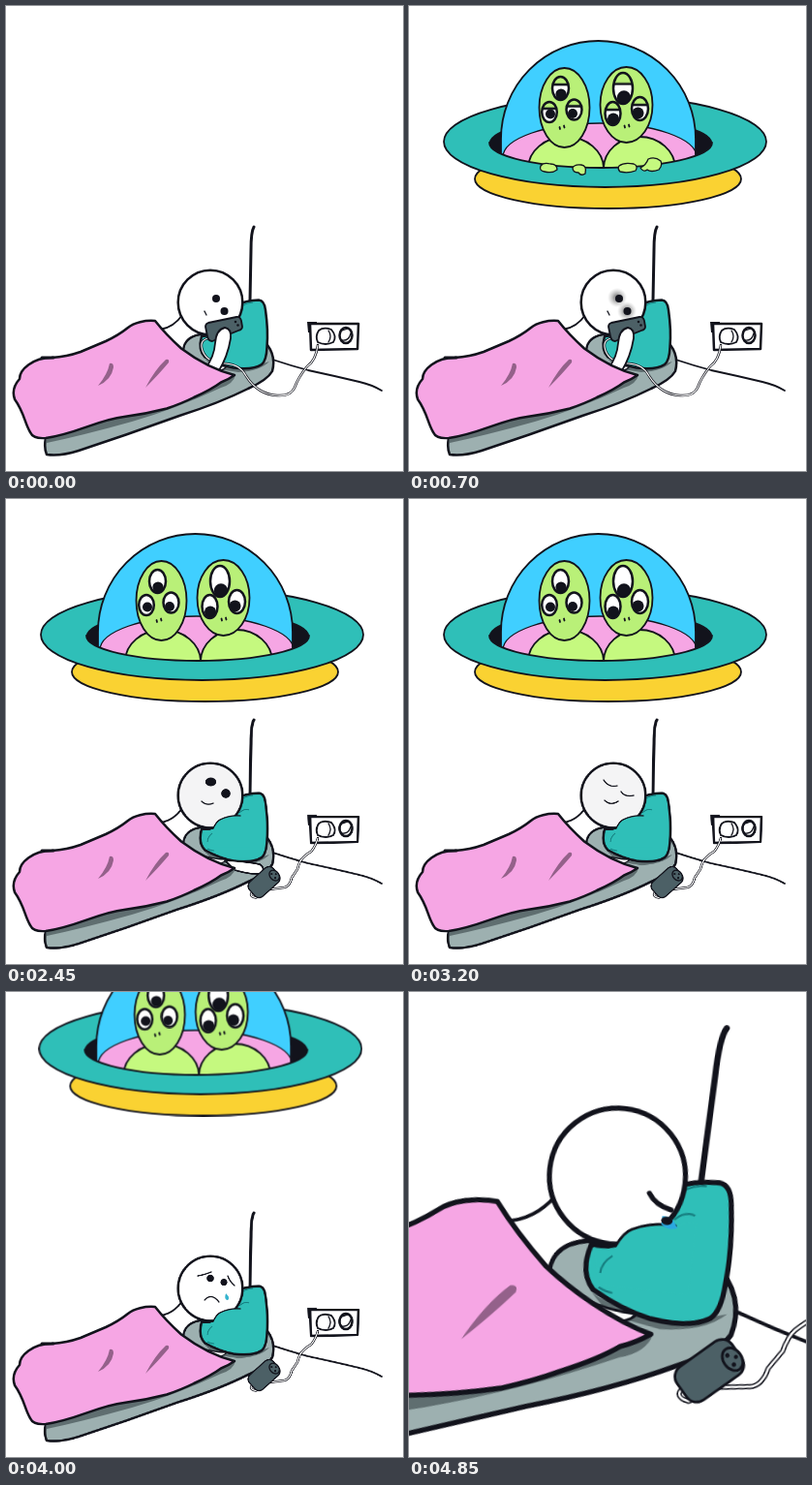
Recreate the animation shown at these times as an HTML page. Size 410 px wide and 480 px high, loop 4950 ms.

```html
<!DOCTYPE html>
<html lang="en">
<head>
<meta charset="utf-8">
<title>Visitors at bedtime</title>
<style>
html, body { margin: 0; width: 100%; height: 100%; overflow: hidden; background: #fff; }
svg { display: block; width: 410px; height: 480px; }
.ink { stroke: #12131c; stroke-width: 2.5; stroke-linejoin: round; stroke-linecap: round; }
.thin { stroke-width: 1.3; }
.mid { stroke-width: 1.8; }
.bold { stroke-width: 3; }
.line { fill: none; }
.white { fill: #fff; }
.dot { fill: #12131c; }
.teal { fill: #2fbfb8; }
.grey { fill: #9db0b0; }
.dark { fill: #4c6066; }
.shade { fill: #5f6e70; }
.pink { fill: #f6a6e4; }
.green { fill: #c5f97f; }
.head { fill: #b9f078; }
.fold { fill: #94618a; }
.crease { fill: none; stroke: #167f80; }
.core { fill: none; stroke: #fff; stroke-width: 1.1; }

.zoom, .ufo, .lid, .tired, .skin, .show { animation: 4.95s linear infinite; }
.show { animation-timing-function: step-end; }
.zoom { animation-name: zoom; }
.ufo { animation-name: fly; }
.lid { animation-name: lid; transform-box: fill-box; }
.tired { animation-name: tired; }
.skin { animation-name: skin; fill: #fff; }
.reading { animation-name: reading; }
.worried { animation-name: worried; }
.smiling { animation-name: smiling; }
.asleep { animation-name: asleep; }
.sad { animation-name: sad; }
.crying { animation-name: crying; }
.held { animation-name: held; }
.dropped { animation-name: dropped; }

@keyframes zoom {
  0%, 88.89% { transform: translate(0, 0) rotate(0) scale(1); animation-timing-function: ease-in-out; }
  97.98%, 100% { transform: translate(-154px, -501.8px) rotate(6.5deg) scale(2.11); }
}
@keyframes fly {
  0% { transform: translate(46px, -214px); animation-timing-function: cubic-bezier(.3, .4, .6, 1); }
  11.1%, 71.7% { transform: translate(0, 0); animation-timing-function: ease-in; }
  77.8% { transform: translate(3px, -38px); }
  80.8% { transform: translate(-1.5px, -81px); }
  84.2% { transform: translate(-28px, -140px); }
  87.9%, 100% { transform: translate(-45px, -214px); }
}
@keyframes lid {
  0%, 15% { transform: translateY(42%); }
  31.3% { transform: translateY(33%); }
  40.4%, 100% { transform: translateY(0); }
}
@keyframes tired { 0%, 5% { opacity: 0; } 13%, 19% { opacity: 1; } 22.2%, 100% { opacity: 0; } }
@keyframes skin { 0%, 38% { fill: #fff; } 45%, 68% { fill: #f4f4f5; } 73%, 100% { fill: #fff; } }
@keyframes reading { 0% { opacity: 1; } 22.2%, 100% { opacity: 0; } }
@keyframes worried { 0% { opacity: 0; } 22.2% { opacity: 1; } 40.4%, 100% { opacity: 0; } }
@keyframes smiling { 0% { opacity: 0; } 40.4% { opacity: 1; } 55.6%, 100% { opacity: 0; } }
@keyframes asleep { 0% { opacity: 0; } 55.6% { opacity: 1; } 72.7%, 100% { opacity: 0; } }
@keyframes sad { 0% { opacity: 0; } 72.7% { opacity: 1; } 89.9%, 100% { opacity: 0; } }
@keyframes crying { 0% { opacity: 0; } 89.9%, 100% { opacity: 1; } }
@keyframes held { 0% { opacity: 1; } 40.4%, 100% { opacity: 0; } }
@keyframes dropped { 0% { opacity: 0; } 40.4%, 100% { opacity: 1; } }
</style>
</head>
<body>
<svg viewBox="0 0 410 480">
  <defs>
    <radialGradient id="bag">
      <stop offset=".3" stop-color="#777" stop-opacity=".75"/>
      <stop offset="1" stop-color="#aaa" stop-opacity="0"/>
    </radialGradient>
    <clipPath id="cabin"><path d="M70 0H330V141H313A115 26 0 0 1 83 141H70Z"/></clipPath>
    <path id="heldCable" d="M209 343Q199 345 203 356Q208 369 227 369Q242 370 248 382Q260 401 280 402Q294 403 298 394Q302 383 311 372Q320 366 322 350"/>
    <path id="looseCable" d="M255 405Q250 410 258 411.5Q264 409 272 403L287 401Q293 400 295 391L301 382Q303 374 306 371Q311 366 315 364Q320 358 322 350"/>
  </defs>

  <g class="zoom">
    <path class="ink line bold" d="M256 228Q253 233 253 252L252 304"/>
    <path class="ink line mid" d="M277 365.5Q295 371.5 312 376Q340 382 365 388Q378 391 388 397"/>

    <g id="outlet">
      <path class="ink white" d="M314 328L364 328L363 354L315 355Z"/>
      <path class="dot" d="M311 326H321V329H315V337H312Z"/>
      <ellipse class="ink white" cx="351" cy="340" rx="6.5" ry="8"/>
      <path class="ink line thin" d="M347 345Q354 346 356 338M347 335L353 333"/>
      <path class="ink white mid" d="M323 335Q328 331 336 334Q342 341 338 347Q330 351 322 347Q319 341 323 335Z"/>
      <path class="ink line thin" d="M333 335Q337 341 333 347"/>
    </g>

    <path class="ink grey" d="M41 446Q39 456 42 463Q56 465 75 459L124 442.5L179 423Q220 410 250 395Q270 386 275 377Q279 362 270 350Q245 338 200 339Q184 342 183 355L150 400Z"/>
    <path class="shade" d="M205 364Q235 380 272 367Q262 377 240 378L215 374Z"/>
    <path class="white" d="M158 334Q172 332 181 319L200 338Q184 341 183 355L168 352Z"/>
    <path class="ink line mid" d="M159 334Q173 332 182 319M183 355Q184 342 200 339"/>
    <path class="ink white thin" d="M200 367Q214 372 228 372Q224 377 215 377Z"/>

    <path class="ink teal" d="M240 308Q248 304 261 303.5Q267 304 268 314Q271 335 269.5 352Q269 366 264 370Q255 376 235 373.5Q221 371 205.5 362.5Q198 355 202 341Q222 341 240 308Z"/>
    <path class="crease" d="M243 310Q249 306 255 306"/>
    <circle class="ink skin" cx="211" cy="306" r="33.3"/>

    <g class="show reading">
      <g class="tired"><circle cx="215" cy="301" r="10" fill="url(#bag)"/><circle cx="225" cy="315" r="10" fill="url(#bag)"/></g>
      <circle class="dot" cx="217" cy="302" r="4"/>
      <circle class="dot" cx="225.5" cy="315" r="4"/>
      <path class="ink line thin" d="M205 315L207 319"/>
    </g>
    <g class="show worried">
      <ellipse class="dot" cx="211.5" cy="292" rx="5.4" ry="4.6"/>
      <ellipse class="dot" cx="227" cy="303.5" rx="4.8" ry="4.6"/>
      <path class="ink line thin" d="M203 287Q207 282 213 282M228 290L236 294M201 312L210 313"/>
    </g>
    <g class="show smiling">
      <ellipse class="dot" cx="211.5" cy="292" rx="5.6" ry="4.5"/>
      <ellipse class="dot" cx="227" cy="304" rx="4.8" ry="4.8"/>
      <path class="ink line thin" d="M202 312Q207 317 214 314"/>
    </g>
    <g class="show asleep ink line thin">
      <path d="M201 290Q206 298 215 296M219 302Q223 308 232 306M202 311Q208 317 216 312"/>
    </g>
    <g class="show sad">
      <circle class="dot" cx="211" cy="295.5" r="3.8"/>
      <circle class="dot" cx="225" cy="299.5" r="3.6"/>
      <path class="ink line thin" d="M198 293Q205 292 212 289M229 293Q231 299 236 303M205 318Q212 310 220 320"/>
      <path fill="#36b4ce" d="M227 311Q232 316 229 318Q225 318 227 311Z"/>
    </g>

    <g class="show dropped">
      <path class="teal" d="M203 341Q209 342 214 340Q217 333 221 331Q231 326 242 327Q248 324 252 324V360H208Z"/>
      <path class="ink line thin" d="M203 341Q209 342 214 340Q217 333 221 331Q231 326 242 327"/>
      <path class="crease" d="M241 324Q246 319 251 321M208 354Q208 349 213 345M208 361Q212 363 215 363"/>
    </g>
    <g class="show crying">
      <path fill="#2aa9e0" d="M235 323Q240 322 243 328Q239 330 235 327Z"/>
      <ellipse class="dot" cx="237.5" cy="325" rx="2.8" ry="2"/>
      <path class="ink line" d="M227.5 312.5Q231 318 239 319.5"/>
    </g>

    <g class="show smiling">
      <path class="ink white mid" d="M226 373Q247 374 262 377Q268 381 264 386Q258 389 236 383Z"/>
    </g>

    <g class="show held">
      <use href="#heldCable" class="ink line"/>
      <use href="#heldCable" class="core"/>
      <path class="ink dark mid" d="M209 327L238 321Q242 320.5 243 325L244 331Q244 334 240 335L213 346Q209 346 208 341L206 331Q206 328 209 327Z"/>
      <circle class="dot" cx="237" cy="326" r="1.3"/><circle class="dot" cx="239.5" cy="329.5" r="1.3"/>
      <path class="ink white mid" d="M216 348Q217 334 226 332Q233 333 232 343Q229 362 219 378L206 374Q215 362 216 348Z"/>
    </g>

    <path class="shade" d="M41 446Q80 436 122 423L166 415L222 389L237 381Q235 390 222 394Q175 416 130 429Q80 443 42 451Z"/>
    <path class="ink pink" d="M154 325C144 324 132 327 126 332Q116 340 103 346L77 357Q63 362 47 363C28 363 14 375 14 385Q5 395 9 406C19 420 19 430 25 440Q28 447 41 446C72 442 95 427 122 424Q145 421 166 415.5Q182 410 194 404Q212 396 222 388.5Q229 386 236 381C216 376 195 364 181 353.5Q165 339 154 325Z"/>
    <path class="ink line bold" d="M37 363L49 363"/>
    <path class="fold" d="M107 369Q111 368 111 373Q109 386 95 392Q105 380 107 369ZM165 365Q169 364 168 368Q158 380 144 394Q154 375 165 365Z"/>

    <g class="show dropped">
      <use href="#looseCable" class="ink line"/>
      <use href="#looseCable" class="core"/>
      <g transform="translate(266.5 395.5) rotate(-42)">
        <rect class="ink dark thin" x="-16.5" y="-10" width="33" height="20" rx="6"/>
        <ellipse class="ink dark thin" cx="12.5" cy="2" rx="4.5" ry="6"/>
        <circle class="dot" cx="11.5" cy="-1" r="1.1"/><circle class="dot" cx="11.5" cy="4.5" r="1.1"/><circle class="dot" cx="14.5" cy="2" r="1"/>
      </g>
    </g>
  </g>

  <g class="ufo">
    <ellipse class="ink mid" fill="#fad232" cx="205.5" cy="178.5" rx="137.5" ry="30.5"/>
    <ellipse class="ink teal mid" cx="202.5" cy="140" rx="166.5" ry="47"/>
    <ellipse class="dot" cx="198" cy="141" rx="115" ry="26"/>
    <g clip-path="url(#cabin)">
      <path fill="#40cfff" d="M95 170V137A100.5 101 0 0 1 296 137V170Z"/>
      <ellipse class="ink pink thin" cx="197" cy="156" rx="100" ry="35"/>
      <ellipse class="ink green mid" cx="162" cy="168" rx="39" ry="33"/>
      <ellipse class="ink green mid" cx="238" cy="168" rx="37" ry="33"/>
      <path class="ink line mid" d="M95 170V137A100.5 101 0 0 1 296 137V170"/>
    </g>
    <path class="ink line mid" d="M83 141A115 26 0 0 0 313 141"/>
    <ellipse class="ink head mid" cx="160.5" cy="105" rx="26" ry="41"/>
    <ellipse class="ink head mid" cx="224.5" cy="102" rx="27" ry="39"/>
    <g id="eyes"></g>
    <path class="ink mid" d="M155.5 125L156 127M160 123.5L160.5 125.5M222.5 123.5L223 125.5M227 122.5L227.5 124.5"/>
    <g class="show held ink green thin">
      <path d="M136 165Q139 161 146 163Q153 163 153 169Q148 173 140 171Q134 170 136 165Z"/>
      <path d="M169 167Q171 163 178 164Q184 165 182 173Q178 176 175 172Q169 172 169 167Z"/>
      <path d="M217 165Q222 161 232 163Q237 165 234 170Q226 173 218 171Q215 168 217 165Z"/>
      <path d="M239 167Q245 164 247 158Q254 155 260 160Q262 165 258 169Q250 172 246 169Q242 172 239 167Z"/>
    </g>
  </g>
</svg>
<script>
// Each eye: centre, radii, pupil centre, pupil radius
const eyes = [
  [156.5, 85, 8.5, 12, 157, 91, 5.6],
  [145, 109.5, 7.8, 10.5, 146, 111.5, 5],
  [170.5, 107, 8, 10.5, 169, 111, 5],
  [221, 85, 10, 16, 222, 94.5, 7.2],
  [210.5, 111, 8, 12, 211, 116.5, 6],
  [238.5, 106, 8.5, 12, 236.5, 110.5, 6],
];
document.getElementById('eyes').innerHTML = eyes.map(([x, y, rx, ry, px, py, r], i) => {
  const oval = cls => `<ellipse class="${cls}" cx="${x}" cy="${y}" rx="${rx}" ry="${ry}"/>`;
  return `<clipPath id="eye${i}">${oval('')}</clipPath>
    <g clip-path="url(#eye${i})">${oval('white')}
      <circle class="dot" cx="${px}" cy="${py}" r="${r}"/>
      <rect class="ink head lid" x="${x - rx - 3}" y="${y - 3 * ry - 2}" width="${2 * rx + 6}" height="${2 * ry}"/>
    </g>${oval('ink line')}`;
}).join('');
</script>
</body>
</html>
```
